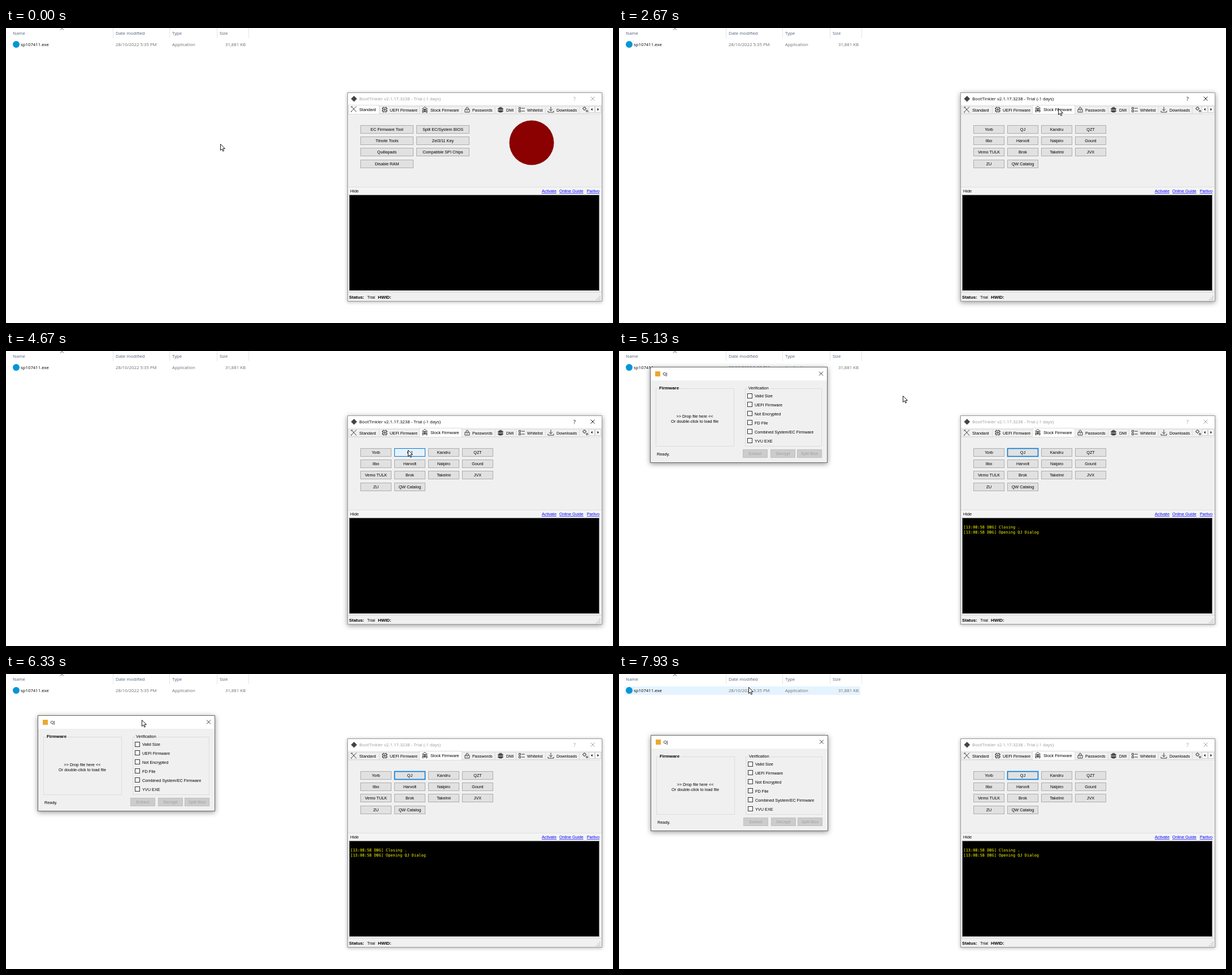
These frames come from a looping animation (1074x522 px, 8000 ms). An HTML page:

```html
<!DOCTYPE html>
<html lang="en">
<head>
<meta charset="utf-8">
<title>Firmware tool walkthrough</title>
<style>
  html, body { margin: 0; width: 100%; height: 100%; overflow: hidden; background: #fff; }
  svg { display: block; width: 100vw; height: 100vh; }
  text { font: 7.3px "Liberation Sans", Arial, sans-serif; white-space: pre; }
  .ui { font: 7.8px "Open Sans", "Noto Sans", sans-serif; }
  .bold { font-size: 7.9px; font-weight: bold; }
  .log { font: 6.93px "DejaVu Sans Mono", monospace; fill: #ff0; }
  .mid { text-anchor: middle; }
  .end { text-anchor: end; }
  .head { fill: #4c607a; }
  .dim { fill: #6d6d6d; }
  .off { fill: #a0a0a0; }
  .link { fill: #00f; text-decoration: underline; }
  .line { fill: none; stroke: #222; }
  .active { filter: drop-shadow(0 2px 5px rgba(0,0,0,.42)); }
  .idle { filter: drop-shadow(0 1px 3px rgba(0,0,0,.3)); }
</style>
</head>
<body>
<svg id="stage" viewBox="0 0 1074 522"></svg>
<script>
const LOOP = 8000;
const stage = document.getElementById('stage');

const text = (x, y, value, cls = '', extra = '') =>
  `<text x="${x}" y="${y}" class="${cls}" ${extra}>${value}</text>`;
const fill = (x, y, w, h, color, extra = '') =>
  `<rect x="${x}" y="${y}" width="${w}" height="${h}" fill="${color}" ${extra}/>`;
const box = (x, y, w, h, color, border, extra = '') =>
  fill(x + .5, y + .5, w - 1, h - 1, color, `stroke="${border}" ${extra}`);
const path = (d, extra = '') => `<path class="line" d="${d}" ${extra}/>`;
const group = (id, body, extra = '') => `<g id="${id}" ${extra}>${body}</g>`;
const button = (x, y, w, label, id = '') =>
  box(x, y, w, 15, '#e1e1e1', '#adadad', id && `id="${id}"`) +
  text(x + w / 2, y + 10.3, label, 'mid');

const explorer = [189, 289, 373, 429].map(x => fill(x, 0, 1, 18, '#e5e5e5')).join('') +
  path('M96 3.5l3-3 3 3', 'stroke="#777" stroke-width=".8"') +
  [[12, 'Name'], [194, 'Date modified'], [294, 'Type'], [378, 'Size']]
    .map(([x, s]) => text(x, 12, s, 'ui head')).join('') +
  fill(10, 22, 417, 15, '#e5f3ff', 'id="row"') +
  '<circle cx="18" cy="29" r="6" fill="#0096d6"/>' +
  text(26, 32, 'sp107411.exe', 'ui') +
  text(194, 32, '28/10/2022 5:35 PM', 'ui dim') +
  text(294, 32, 'Application', 'ui dim') +
  text(424, 32, '31,881 KB', 'ui dim end');

// Each tab: left edge, right edge, icon x, label x, label, icon drawn in a 10px cell.
const TABS = [
  [606, 660, 610, 625, 'Standard', 'M1 0l9 10M10 0L1 9M0 2l3-2M0 9l2 1'],
  [660, 731, 665, 679, 'UEFI Firmware', 'M1.5 1.5h7v7h-7zM3.5 4h3v2h-3zM0 3h1.5M0 7h1.5M8.5 3H10M8.5 7H10M3 0v1.5M7 0v1.5M3 8.5V10M7 8.5V10'],
  [731, 806, 736, 751, 'Stock Firmware', 'M0 4l5-4 5 4M2 4h6v4H2zM4 5h2v2H4zM1 6v4h2M9 6v4H7M5 8v2'],
  [806, 865, 811, 825, 'Passwords', 'M1 4.5h8v5H1zM3 4.5V2q2-3 4 0v2.5M5 6v2'],
  [865, 902, 870, 885, 'DMI', 'M2 2h6v7H2zM4 0v10M6 0v10M0 3h10M0 5.5h10M0 8h10'],
  [902, 954, 907, 922, 'Whitelist', 'M.5 1h3v3h-3zM.5 6h3v3h-3zM5 2.5h6M5 7.5h6'],
  [954, 1014, 959, 974, 'Downloads', 'M5 0v7M2 4l3 3 3-3M0 7v2.5h10V7'],
  [1014, 1031, 1020, 0, '', 'M1 3a2.5 2.5 0 1 0 5 0a2.5 2.5 0 1 0-5 0M6.5 7.5a1.5 1.5 0 1 0 3 0a1.5 1.5 0 1 0-3 0M3.5 0v1M3.5 5.5v1M0 3h1M6 3h1']
];
const tabs = selected => TABS.map(([left, right, iconX, labelX, label, icon], i) => {
  const on = i === selected;
  const hover = selected === 0 && i === 2 ? 'id="tabHover"' : '';
  return (on ? box(left, 136, right - left + 1, 17, '#fff', '#dcdcdc')
             : box(left, 138, right - left + 1, 14, '#f0f0f0', '#dcdcdc', hover)) +
    path(icon, `transform="translate(${iconX} ${on ? 138.5 : 139.5})" stroke-width=".9"`) +
    text(labelX, on ? 146.8 : 147.8, label);
}).join('');

const standardPage = tabs(0) +
  ['EC Firmware Tool', 'Tilnote Tools', 'Quillapads', 'Disable RAM']
    .map((s, i) => button(627, [172, 192, 212, 233][i], 94, s)).join('') +
  ['Split EC/System BIOS', 'Zel3/11 Key', 'Compatible SPI Chips']
    .map((s, i) => button(726, 172 + i * 20, 94, s)).join('') +
  '<circle cx="930" cy="203" r="39.5" fill="#8b0000"/>';

const VENDORS = ['Yorb', 'QJ', 'Kandru', 'QZT', 'Ilbo', 'Harvolt', 'Nalpiro', 'Gourd',
  'Vemo TULK', 'Brok', 'Takelmi', 'JVX', 'ZU', 'QW Catalog'];
const stockPage = tabs(2) + VENDORS.map((s, i) =>
  button(627 + i % 4 * 60, [172, 192, 212, 233][i >> 2], 55, s, i === 1 ? 'vendor' : '')).join('');

const scrollButton = (x, arrow) => box(x, 138, 11, 12, '#fdfdfd', '#d0d0d0') +
  `<path d="M${x + 5.5 - arrow} 141.5l${arrow * 2.4} 2.5l${-arrow * 2.4} 2.5z"/>`;
const grip = [[0, 0], [-3, 0], [-6, 0], [0, -3], [-3, -3], [0, -6]]
  .map(([x, y]) => fill(1050 + x, 480 + y, 1.4, 1.4, '#a5a5a5')).join('');

const mainWindow = fill(604, 114, 451, 370, '#fff', 'id="mainShadow"') +
  box(604, 114, 451, 370, '#f0f0f0', '#9a9a9a') +
  fill(605, 115, 449, 21, '#fff') +
  fill(612, 121.5, 7.5, 7.5, '#444', 'transform="rotate(45 615.75 125.25)"') +
  group('mainTitle', text(625, 128.2, 'BootTinkler v2.1.17.3238 - Trial (-1 days)', 'ui') +
    text(1004, 128.5, '?', 'ui', 'style="font-size:9px"') +
    path('M1034.5 121.5l7 7m0-7l-7 7', 'style="stroke:currentColor" stroke-width=".9"'), 'fill="currentColor"') +
  fill(605, 152, 449, 129, '#f0f0f0') +
  fill(605, 152, 449, 1, '#e4e4e4') +
  group('standard', standardPage) + group('stock', stockPage) +
  scrollButton(1031, -1) + scrollButton(1042, 1) +
  fill(605, 281, 449, 14, '#f4f4f4') + fill(605, 281, 449, 1, '#e0e0e0') +
  text(609, 291, 'Hide') + text(948, 291, 'Activate', 'link') +
  text(979, 291, 'Online Guide', 'link') + text(1050, 291, 'Parlivo', 'link end') +
  box(607, 295, 443, 170, '#000', '#828790') +
  group('log', text(609.5, 313.5, '[13:08:58 DBG] Closing .', 'log') +
    text(609.5, 322.8, '[13:08:58 DBG] Opening QJ Dialog', 'log')) +
  fill(605, 467, 449, 1, '#d7d7d7') +
  text(607, 479, 'Status:', 'bold') + text(639, 479, 'Trial') +
  text(658, 479, 'HWID:', 'bold') + grip;

const tooltip = box(721, 190, 216, 14, '#fff', '#767676', 'class="idle"') +
  text(829, 199.5, 'Extract, decrypt and split BIOS update from QJ website.', 'ui mid',
    'style="font-size:7.3px" fill="#575757"');

// Dialog coordinates are relative to its top left corner.
const CHECKS = ['Valid Size', 'UEFI Firmware', 'Not Encrypted', 'FD File',
  'Combined System/EC Firmware', 'YVU EXE'];
const frame = (x, w, label, labelW, cls) => box(x, 38, w, 103, 'none', '#dcdcdc') +
  fill(x + 5, 35, labelW, 6, '#f0f0f0') + text(x + 6, 40.3, label, cls);
const dialog = fill(0, 0, 314, 170, '#fff', 'class="active"') +
  box(0, 0, 314, 170, '#f0f0f0', '#666') + fill(1, 1, 312, 23, '#fff') +
  fill(9, 8, 9, 9, '#e9a92f') + text(22.5, 15, 'QJ', 'ui') +
  path('M299 8.5l7 7m0-7l-7 7', 'stroke-width=".9"') +
  frame(10, 139, 'Firmware', 36, 'bold') + frame(168, 136, 'Verification', 39, '') +
  text(79, 90, '&gt;&gt; Drop file here &lt;&lt;', 'mid') +
  text(79, 99.3, 'Or double-click to load file', 'mid') +
  CHECKS.map((s, i) => box(172, 47 + i * 15.9 | 0, 9, 9, '#fff', '#333') +
    text(185, 54 + i * 15.9, s)).join('') +
  text(12, 157, 'Ready.') +
  [['Extract', 164], ['Decrypt', 213], ['Split Bios', 260]].map(([s, x]) =>
    box(x, 146, 44, 15, '#ccc', '#bfbfbf') + text(x + 22, 156.3, s, 'mid off')).join('');

const pointer = '<path d="M.5.5v11l2.6-2.4 1.7 4 1.8-.8-1.7-3.9h3.5z" fill="#fff" stroke="#000" stroke-width=".9"/>';

stage.innerHTML = explorer + group('main', mainWindow) + group('tooltip', tooltip) +
  group('dialog', dialog) + group('pointer', pointer);
const part = id => document.getElementById(id);
const [row, tabHover, mainShadow, mainTitle, standard, stock, vendor, log, tip, dialogBox, cursor] =
  ['row', 'tabHover', 'mainShadow', 'mainTitle', 'standard', 'stock', 'vendor', 'log',
    'tooltip', 'dialog', 'pointer'].map(part);

// Time, x, y
const CURSOR_PATH = [
  [530, 379, 205], [700, 480, 120], [900, 650, 50], [1120, 841, 78], [1330, 795, 124],
  [1470, 783, 138], [1730, 780, 140], [2650, 780, 140], [2950, 738, 170], [3200, 724, 177],
  [3600, 724, 177], [3930, 710, 176], [4200, 710, 176], [4330, 711, 175], [4800, 711, 175],
  [5100, 520, 85], [5470, 300, 18], [5600, 262, 1], [5700, 246, 20], [5800, 241, 36],
  [6070, 241, 36], [6530, 240, 116], [6600, 240, 120], [6870, 238, 85], [7300, 222, 48],
  [7730, 215, 25], [7930, 229, 23]
];
const DIALOG_PATH = [[6070, 55, 28], [6530, 56, 108]];

function positionAt(points, t) {
  const next = points.findIndex(p => p[0] > t);
  if (next < 1) return (next ? points.at(-1) : points[0]).slice(1);
  const [t0, x0, y0] = points[next - 1], [t1, x1, y1] = points[next];
  const k = (t - t0) / (t1 - t0);
  return [x0 + (x1 - x0) * k, y0 + (y1 - y0) * k];
}
const show = (el, on) => el.setAttribute('visibility', on ? 'inherit' : 'hidden');
const inside = (x, y, left, top, w, h) => x >= left && x < left + w && y >= top && y < top + h;

function styleVendor(t, hovered, opened) {
  const pressed = t >= 4470 && t < 4600;
  vendor.setAttribute('fill', pressed ? '#cce4f7' : hovered ? '#e5f1fb' : '#e1e1e1');
  vendor.setAttribute('stroke', pressed ? '#005499' : hovered || opened ? '#0078d7' : '#adadad');
  vendor.setAttribute('stroke-width', opened ? 1.6 : 1);
}

function draw(t) {
  const [x, y] = positionAt(CURSOR_PATH, t).map(Math.round);
  const [dx, dy] = positionAt(DIALOG_PATH, t).map(Math.round);
  const stockOpen = t >= 2000, opened = t >= 4730;
  const active = stockOpen && !opened;

  show(standard, !stockOpen);
  show(stock, stockOpen);
  tabHover.setAttribute('fill', inside(x, y, 731, 138, 75, 14) ? '#d8eaf9' : '#f0f0f0');
  mainShadow.setAttribute('class', active ? 'active' : 'idle');
  mainTitle.setAttribute('color', active ? '#000' : '#999');
  styleVendor(t, !opened && inside(x, y, 687, 172, 55, 15), opened);
  show(log, opened);
  show(dialogBox, opened);
  dialogBox.setAttribute('transform', `translate(${dx} ${dy})`);
  tip.setAttribute('opacity', t < 4500 ? Math.min(1, Math.max(0, (t - 3500) / 200)) : 0);
  show(row, inside(x, y, 10, 22, 417, 15) && !(opened && inside(x, y, dx, dy, 314, 170)));
  cursor.setAttribute('transform', `translate(${x} ${y})`);
}

function tick() {
  draw(performance.now() % LOOP);
  requestAnimationFrame(tick);
}
tick();
</script>
</body>
</html>
```
